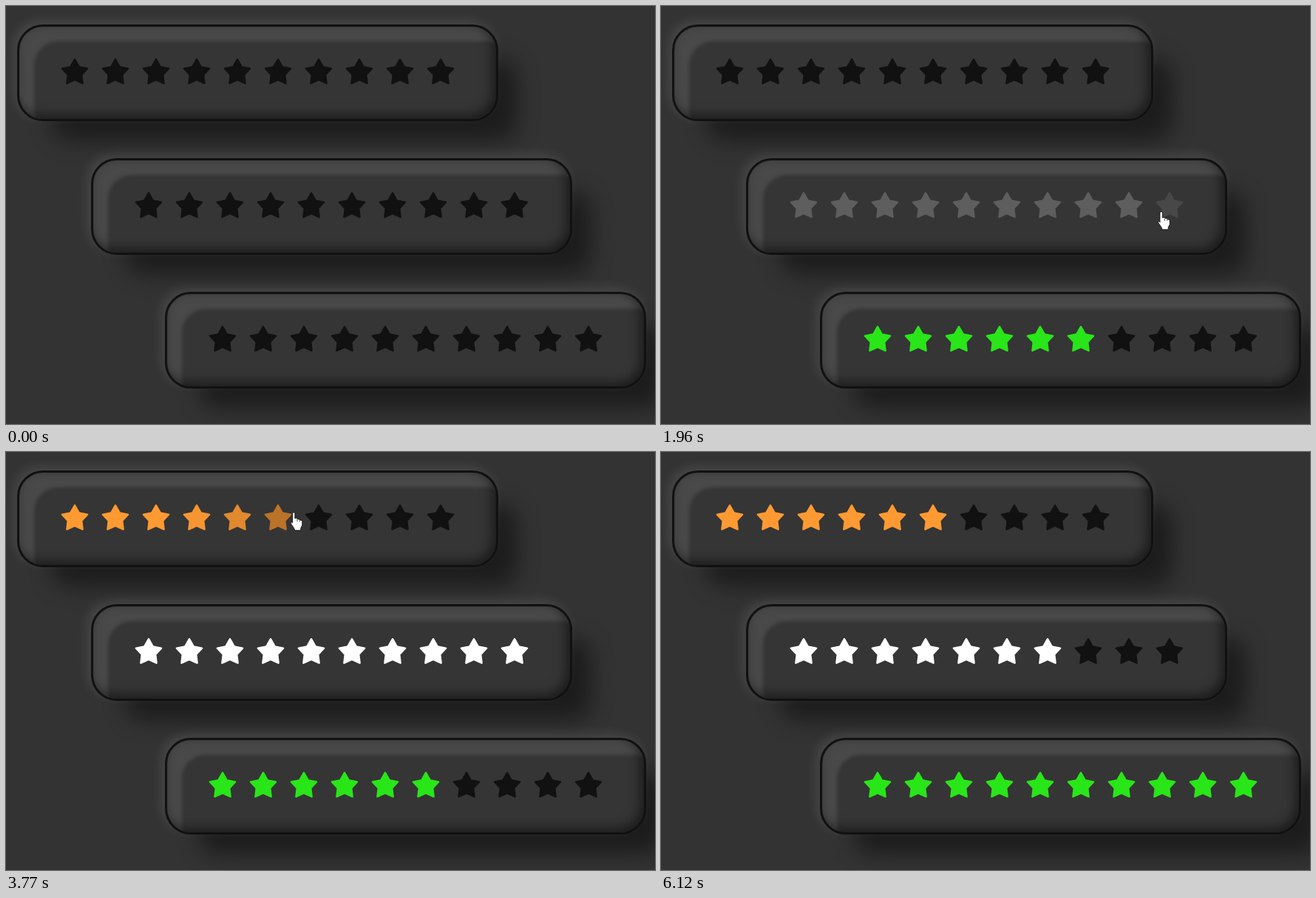
An HTML page that plays this animation: 878x566 px, repeating every 6450 ms.

```html
<!DOCTYPE html>
<html lang="en">
<head>
<meta charset="utf-8">
<title>Star ratings</title>
<style>
  html, body { margin: 0; width: 100%; height: 100%; overflow: hidden; background: #333; }
  .stage { position: relative; width: 878px; height: 566px; overflow: hidden; }
  .panel {
    position: absolute; box-sizing: border-box; width: 651px; height: 131px;
    border: 3px solid #111; border-radius: 35px; background: #353535;
    box-shadow:
      -5px -5px 15px rgba(255, 255, 255, .1),
      36px 36px 30px -10px rgba(0, 0, 0, .45),
      inset -5px -5px 15px rgba(0, 0, 0, .5),
      inset 20px 20px 5px rgba(255, 255, 255, .1);
  }
  svg { position: absolute; left: 0; top: 0; }
  #stars { stroke-width: 2.6; stroke-linejoin: round; }
  #hand, #arrow { fill: #fff; stroke: #111; stroke-width: .9; stroke-linejoin: round; }
</style>
</head>
<body>
<div class="stage" id="stage">
  <svg id="art" width="878" height="566" viewBox="0 0 878 566">
    <g id="stars"></g>
    <g id="cursor">
      <circle id="pulse" r="15" fill="#ff0" fill-opacity=".47"/>
      <g id="hand">
        <path d="M-1.5 1.5a1.7 1.7 0 0 1 3.4 0V8l1-.5 2.3.6.8.8 2.2.3.7.9 2 .6.9 1.4v5l-2 4v3h-8l-1-2.5-4.3-6.5q-.8-2 .8-2.4 1 0 1.2 1.5z"/>
        <path d="M5 8.8v3.4M8.3 9.8v2.6" fill="none" stroke-width=".7"/>
      </g>
      <path id="arrow" d="M0 0V16l3.7-3.4 2.4 5.6 2.4-1-2.4-5.5h5z"/>
    </g>
  </svg>
</div>
<script>
const LOOP = 6450, FADE = 500, PULSE = 120, STEP = 5;
const STARS = 10, GAP = 55, ROW_X = 100, ROW_Y = 181, STAR_TOP = 71, STAR_SIZE = 36;
const DARK = [17, 17, 17];
const colors = [[255, 154, 51], [255, 255, 255], [41, 230, 25]];

// The pointer glides from stop to stop along curves, pressing at some stops.
const start = [772, 562];
const moves = [
  { leave: 380, arrive: 1040, bend: [584, 556], to: [590, 449], press: 1090 },
  { leave: 1500, arrive: 2140, bend: [571, 293], to: [695, 275], press: 2170 },
  { leave: 2300, arrive: 3000, bend: [292, 127], to: [218, 73], press: 2930 },
  { leave: 3360, arrive: 3700, bend: [230, 78], to: [389, 82], press: 3790 },
  { leave: 3910, arrive: 4260, bend: [392, 250], to: [524, 281], press: 4390 },
  { leave: 4540, arrive: 5050, bend: [612, 352], to: [701, 423] },
  { leave: 5100, arrive: 5450, bend: [742, 437], to: [783, 451], press: 5380 },
  { leave: 5500, arrive: 6200, bend: [660, 459], to: [818, 575] }
];

const byId = id => document.getElementById(id);
const lerp = (a, b, k) => a + (b - a) * k;
const show = (id, on) => byId(id).setAttribute('visibility', on ? 'visible' : 'hidden');

function pointerAt(time) {
  const i = moves.findLastIndex(move => move.leave <= time);
  if (i < 0) return start;
  const { leave, arrive, bend, to } = moves[i];
  const from = i ? moves[i - 1].to : start;
  const k = 1 - (1 - Math.min(1, (time - leave) / (arrive - leave))) ** 2;
  return to.map((end, axis) => lerp(lerp(from[axis], bend[axis], k), lerp(bend[axis], end, k), k));
}

// The CSS "ease" curve, solved by bisection.
function ease(x) {
  let low = 0, high = 1;
  for (let i = 0; i < 20; i++) {
    const u = (low + high) / 2;
    if (.75 * u * (1 - u) + u ** 3 < x) low = u; else high = u;
  }
  return .3 * low * (1 - low) ** 2 + 3 * low ** 2 * (1 - low) + low ** 3;
}

function hoverAt(time) {
  const [x, y] = pointerAt(time);
  for (let row = 0; row < colors.length; row++) {
    const depth = y - STAR_TOP - row * ROW_Y;
    const number = Math.floor((x - 6.5 - row * ROW_X) / GAP);
    if (depth >= 0 && depth <= STAR_SIZE && number >= 1 && number <= STARS) return { row, number };
  }
  return null;
}

function levelAt(fades, time) {
  const fade = fades.findLast(f => f.begin <= time);
  return fade ? lerp(fade.from, fade.to, ease(Math.min(1, (time - fade.begin) / fade.span))) : 0;
}

function addPanel(row) {
  const panel = document.createElement('div');
  panel.className = 'panel';
  panel.style.left = `${15 + ROW_X * row}px`;
  panel.style.top = `${25 + ROW_Y * row}px`;
  byId('stage').insertBefore(panel, byId('art'));
}

function addStar(row, number) {
  const x = 38 + GAP * number + ROW_X * row, y = STAR_TOP + 19.2 + ROW_Y * row;
  const points = Array.from({ length: 10 }, (_, i) => {
    const radius = i % 2 ? 9.6 : 17.9, angle = i * Math.PI / 5;
    return [x + radius * Math.sin(angle), y - radius * Math.cos(angle)].map(v => v.toFixed(2));
  });
  const shape = document.createElementNS('http://www.w3.org/2000/svg', 'polygon');
  shape.setAttribute('points', points.join(' '));
  byId('stars').append(shape);
  return { row, number, shape, fades: [], lit: 0 };
}

// Walks through the loop once and notes when each star starts to fade.
function planFades() {
  const ratings = colors.map(() => 0);
  for (let time = 0; time < LOOP; time += STEP) {
    const hover = hoverAt(time);
    if (hover && moves.some(m => m.press + PULSE === time)) ratings[hover.row] = hover.number;
    for (const star of stars) {
      const hovered = hover && hover.row === star.row ? hover.number : 0;
      const lit = Number(star.number <= Math.max(ratings[star.row], hovered));
      if (lit === star.lit) continue;
      const from = levelAt(star.fades, time);
      star.fades.push({ begin: time, from, to: lit, span: FADE * Math.abs(lit - from) || 1 });
      star.lit = lit;
    }
  }
}

function draw(time) {
  for (const { row, shape, fades } of stars) {
    const level = levelAt(fades, time);
    const paint = `rgb(${DARK.map((d, i) => Math.round(lerp(d, colors[row][i], level)))})`;
    shape.setAttribute('fill', paint);
    shape.setAttribute('stroke', paint);
  }
  const visible = time >= moves[0].leave, hand = Boolean(hoverAt(time));
  byId('cursor').setAttribute('transform', `translate(${pointerAt(time)})`);
  show('hand', visible && hand);
  show('arrow', visible && !hand);
  show('pulse', moves.some(m => time >= m.press && time < m.press + PULSE));
}

const stars = colors.flatMap((_, row) => {
  addPanel(row);
  return Array.from({ length: STARS }, (_, i) => addStar(row, i + 1));
});
planFades();

const began = performance.now();
function tick() {
  draw((performance.now() - began) % LOOP);
  requestAnimationFrame(tick);
}
tick();
</script>
</body>
</html>
```
